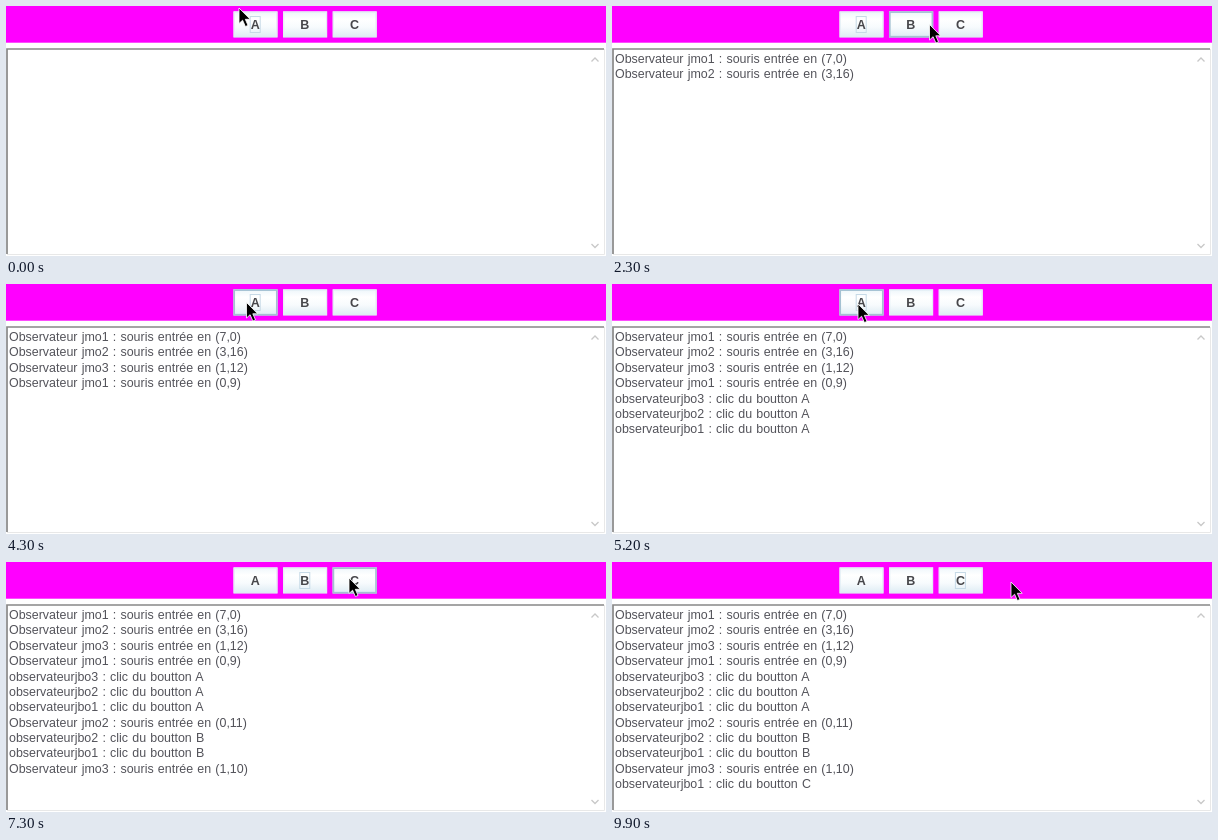
Recreate the animation shown at these times as an HTML page. Size 600 px wide and 250 px high, loop 10000 ms.

```html
<!DOCTYPE html>
<html lang="fr">
<head>
<meta charset="utf-8">
<style>
  html, body { margin: 0; width: 100%; height: 100%; overflow: hidden; background: #fff; }
  svg { display: block; }
  text { font-family: "Liberation Sans", Arial, sans-serif; }
  .log text { font-size: 12.45px; word-spacing: .75px; fill: #53535a; }
  .label { font-size: 12.5px; font-weight: bold; fill: #47474b; text-anchor: middle; }
  .chevron { fill: none; stroke: #c8c8c8; stroke-width: 1.3; }
</style>
</head>
<body>
<svg width="600" height="250" viewBox="0 0 600 250">
  <defs>
    <linearGradient id="normal" x2="0" y2="1">
      <stop offset="0" stop-color="#edf6fa"/>
      <stop offset=".3" stop-color="#fff"/>
      <stop offset=".6" stop-color="#f7fbfd"/>
      <stop offset="1" stop-color="#dcebf3"/>
    </linearGradient>
  </defs>
  <rect width="600" height="36.7" fill="#f0f"/>
  <path d="M598 43H1V248" fill="none" stroke="#888" stroke-width="1.7"/>
  <path d="M1 248.5H598.5V43" fill="none" stroke="#e8e8e8"/>
  <path class="chevron" d="M585.5 55.5L589 52L592.5 55.5M585.5 238L589 241.5L592.5 238"/>
  <g id="buttons"></g>
  <g id="log" class="log"></g>
  <path id="cursor" d="M0 0V15.5L3.6 12.2L6.4 18.5L9 17.4L6.3 11.3H11.2Z"
        fill="#000" stroke="#fff" stroke-width=".8"/>
</svg>
<script>
const LOOP = 10000, STEP = 100, NAMES = "ABC";

// The pointer rests between glides, each made of equal steps.
const home = { x: 233, y: 2 };
const glides = [
  { start: 100, steps: 2, x: 239, y: 14 },
  { start: 400, steps: 1, x: 257, y: 15 },
  { start: 800, steps: 3, x: 246, y: 14 },
  { start: 1500, steps: 3, x: 292, y: 20 },
  { start: 2200, steps: 4, x: 343, y: 17 },
  { start: 3500, steps: 1, x: 348, y: 9 },
  { start: 4000, steps: 1, x: 224, y: 14 },
  { start: 4100, steps: 4, x: 246, y: 20 },
  { start: 5700, steps: 8, x: 292, y: 17 },
  { start: 7000, steps: 4, x: 343, y: 16 },
  { start: 9800, steps: 2, x: 399, y: 20 }
];

const enter = (time, n, at) =>
  ({ time, lines: [`Observateur jmo${n} : souris entrée en (${at})`] });

// Observers answer a click in reverse order.
const click = (time, button, observers) => ({
  time, button,
  lines: Array.from({ length: observers }, (_, i) =>
    `observateurjbo${observers - i} : clic du boutton ${NAMES[button]}`)
});

const events = [
  enter(100, 1, "7,0"), enter(1600, 2, "3,16"), enter(2400, 3, "1,12"),
  enter(4100, 1, "0,9"), click(5200, 0, 3),
  enter(6200, 2, "0,11"), click(6700, 1, 2),
  enter(7200, 3, "1,10"), click(7900, 2, 1)
];
const clicks = events.filter(e => "button" in e);

function add(parent, tag, attrs, text = "") {
  const node = document.createElementNS("http://www.w3.org/2000/svg", tag);
  for (const key in attrs) node.setAttribute(key, attrs[key]);
  node.textContent = text;
  parent.append(node);
  return node;
}

const byId = id => document.getElementById(id);
const cursor = byId("cursor");
const show = (node, on) => node.setAttribute("visibility", on ? "visible" : "hidden");

const buttons = [...NAMES].map((name, i) => {
  const x = 227.4 + i * 49.6, parent = byId("buttons");
  const face = add(parent, "rect", { x, y: 5.3, width: 44.2, height: 26.2 });
  const rim = add(parent, "rect", { x: x + .8, y: 6.1, width: 42.6, height: 24.6, fill: "none" });
  const focus = add(parent, "rect", {
    x: x + 16.8, y: 10.5, width: 10, height: 16, fill: "none", stroke: "#c6d9e6"
  });
  add(parent, "text", { class: "label", x: x + 21.8, y: 23.4 }, name);
  return { x, face, rim, focus };
});

const lines = events
  .flatMap(({ time, lines }) => lines.map(text => ({ time, text })))
  .map(({ time, text }, i) => ({
    time, node: add(byId("log"), "text", { x: 3, y: 57 + i * 15.38 }, text)
  }));

function pointerAt(t) {
  let { x, y } = home;
  for (const g of glides) {
    if (t < g.start) break;
    const p = Math.min(1, (Math.floor((t - g.start) / STEP) + 1) / g.steps);
    x += (g.x - x) * p;
    y += (g.y - y) * p;
  }
  return { x, y };
}

function draw(t) {
  const { x, y } = pointerAt(t);
  cursor.setAttribute("transform", `translate(${x} ${y})`);

  const last = clicks.findLast(c => t >= c.time - STEP);
  const active = last ? last.button : 0;
  const held = last && t < last.time;
  buttons.forEach((b, i) => {
    const hover = x >= b.x - .5 && x < b.x + 44 && y >= 5 && y < 31;
    b.face.setAttribute("fill", held && i === active ? "#d3e6f3" : "url(#normal)");
    b.rim.setAttribute("stroke", hover ? "#a3c1d2" : "#e0edf4");
    b.rim.setAttribute("stroke-width", hover ? 1.7 : 1);
    show(b.focus, i === active);
  });

  for (const { time, node } of lines) show(node, t >= time);
}

const start = performance.now();
function tick() {
  draw((performance.now() - start) % LOOP);
  requestAnimationFrame(tick);
}
tick();
</script>
</body>
</html>
```
